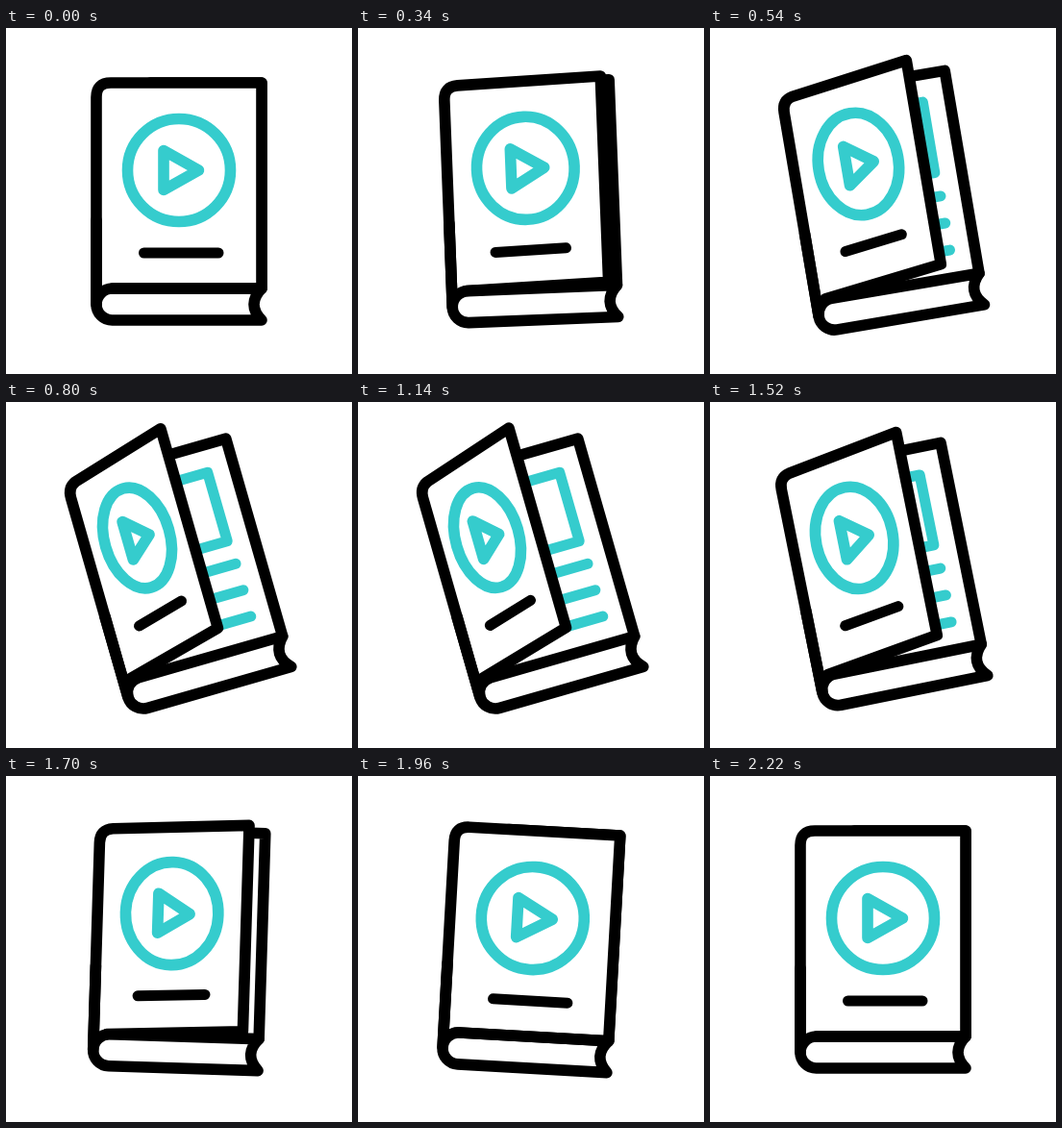
Write an HTML page with a canvas that moves like this. It is 360 by 360 pixels and loops after 2.4 s.

```html
<!DOCTYPE html>
<html>
<head>
<meta charset="utf-8">
<style>
html, body { margin: 0; height: 100%; overflow: hidden; background: #fff; }
canvas { display: block; }
</style>
</head>
<body>
<canvas id="stage" width="360" height="360"></canvas>
<script>
const ctx = document.getElementById('stage').getContext('2d');
const LOOP = 2400, BLACK = '#000', TEAL = '#35cccd';
const HINGE = 94, WIDTH = 172;

// [time, value] pairs, eased in and out between neighbours
const tilt = [[0, 0], [200, 0], [800, -16], [1400, -16], [1800, 5], [2200, 0], [LOOP, 0]];
const opening = [[0, 0], [200, 0], [800, .945], [1100, 1], [1260, 1], [1920, 0], [LOOP, 0]];

const mix = (a, b, k) => a + (b - a) * k;

function at(keys, t) {
  const i = keys.findIndex(k => k[0] > t);
  const [t0, a] = keys[i - 1], [t1, b] = keys[i];
  const u = (t - t0) / (t1 - t0);
  return mix(a, b, u * u * (3 - 2 * u));
}

function stroke(path, color, width = 11.6) {
  ctx.strokeStyle = color;
  ctx.lineWidth = width;
  ctx.stroke(path);
}

const page = new Path2D('M150 57H266V271');
const band = new Path2D('M94 200V287.5A16.5 16.5 0 0 0 110.5 304H266Q250 287.5 266 271H110.5A16.5 16.5 0 0 0 94 287.5');
const print = new Path2D('M130 85.5H238V160H130ZM130 185H240M130 213.5H240M130 242H240');
const icon = new Path2D('M233.5 148A53.5 53.5 0 1 1 126.5 148A53.5 53.5 0 1 1 233.5 148ZM164 127.5V168.5L200.5 148Z');
const label = new Path2D('M143.5 234H221');

function drawCover(p) {
  const right = 266 - 66 * p;
  const cover = new Path2D();
  cover.moveTo(mix(110.5, 99, p), mix(271, 270, p));
  cover.lineTo(right, 271 - 28.4 * p);
  cover.lineTo(right, 57 - 30.3 * p);
  cover.lineTo(mix(109, 103, p), 57);
  cover.quadraticCurveTo(HINGE, mix(57, 61, p), HINGE, 72);
  cover.lineTo(HINGE, 287.5);
  ctx.fillStyle = '#fff';
  ctx.fill(cover);
  stroke(cover, BLACK);

  // squeeze the artwork towards the hinge, keeping line weights
  const sx = (right - HINGE) / WIDTH;
  const onCover = (path, skew, rise) => {
    const moved = new Path2D();
    moved.addPath(path, new DOMMatrix([sx, -skew * p, 0, 1, HINGE * (1 - sx), (HINGE * skew - rise) * p]));
    return moved;
  };
  stroke(onCover(icon, 0, 18), TEAL);
  stroke(onCover(label, 30 / WIDTH, 6.7), BLACK, 11);
}

function draw(now) {
  const t = now % LOOP;
  ctx.setTransform(1, 0, 0, 1, 0, 0);
  ctx.fillStyle = '#fff';
  ctx.fillRect(0, 0, 360, 360);
  ctx.lineCap = ctx.lineJoin = 'round';
  ctx.translate(180, 180);
  ctx.rotate(at(tilt, t) * Math.PI / 180);
  ctx.translate(-180, -180);

  stroke(print, TEAL, 11);
  stroke(page, BLACK);
  drawCover(at(opening, t));
  stroke(band, BLACK);
}

const start = performance.now();
function tick() {
  draw(performance.now() - start);
  requestAnimationFrame(tick);
}
tick();
</script>
</body>
</html>
```
